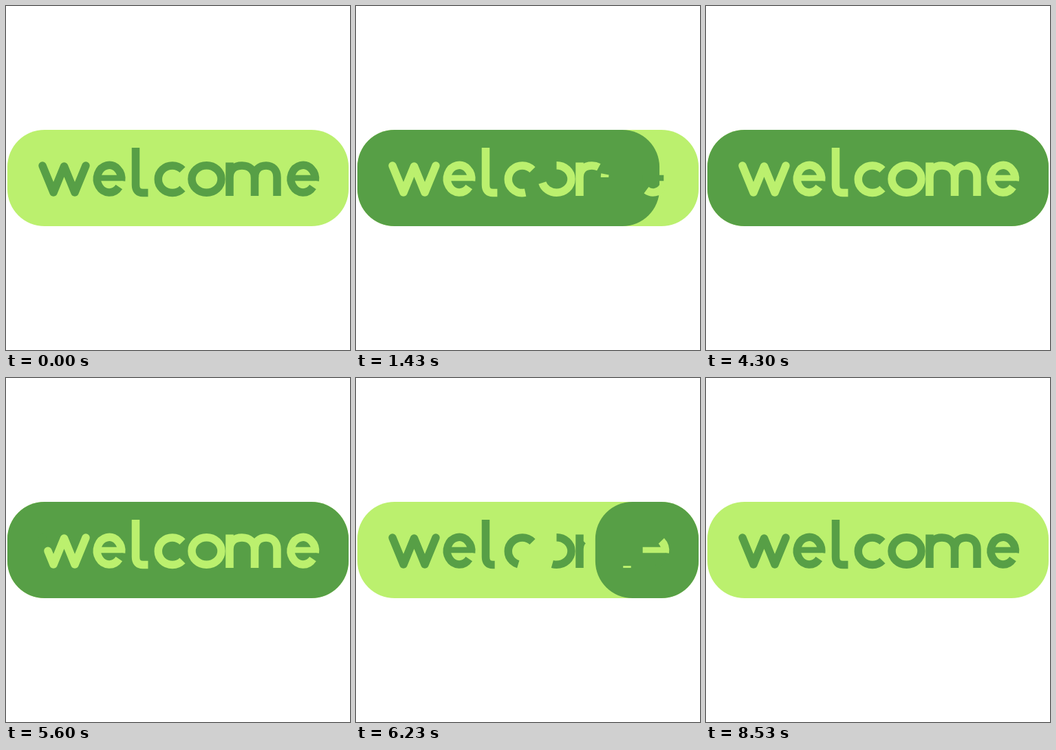
Recreate the animation shown at these times as an HTML page. Size 500x500 px, loop 9910 ms.

```html
<!DOCTYPE html>
<html lang="en">
<head>
<meta charset="utf-8">
<title>welcome</title>
<style>
html, body { margin: 0; width: 100%; height: 100%; overflow: hidden; background: #fff; }
svg { display: block; width: 100%; height: 100%; }
path { fill: none; }
</style>
</head>
<body>
<svg id="stage" viewBox="0 0 500 500" role="img" aria-label="welcome">
  <clipPath id="frame"><rect x="2" y="180" width="496" height="140" rx="54"/></clipPath>
  <g clip-path="url(#frame)">
    <rect x="2" y="180" width="496" height="140" fill="#bbf06e"/>
    <rect id="pill" y="180" width="620" height="140" rx="54" fill="#579f46"/>
    <g id="old"></g>
    <g id="new"></g>
  </g>
</svg>
<script>
const LIGHT = '#bbf06e', DARK = '#579f46';
const LOOP = 9910, STARTS = [500, 5400], LENGTH = 1630;
const ERASE_SPAN = 360, DRAW_SPAN = 600;

// from..to is the share of the letter's progress that this stroke takes.
const stroke = (d, erase, draw, { width = 11.5, from = 0, to = 1, end = 'butt' } = {}) =>
  ({ d, erase, draw, width, from, to, end });

// The bowl runs clockwise from the bottom terminal, then the thinner bar follows.
const letterE = (x, erase, draw) => [
  stroke(`M${x + 14.3} 263 A17.7 19.8 0 1 1 ${x + 17.6} 254`, erase, draw, { to: 0.79 }),
  stroke(`M${x + 18} 250 H${x - 15}`, erase, draw, { width: 8.5, from: 0.79 })
];

const strokes = [
  stroke('M53 232 L69 271 L84.5 233 L100 271 L116 232', 200, 220, { end: 'round' }),
  ...letterE(150, 298, 280),
  stroke('M188.5 206 V260 Q188.5 271.5 199 271.5 H206.5', 395, 380),
  stroke('M256.5 238 A20.5 19.8 0 1 0 256.5 265.5', 481, 480),
  stroke('M291.5 231.7 A21.5 19.8 0 0 1 291.5 271.3 A21.5 19.8 0 0 1 291.5 231.7', 510, 560),
  stroke('M325 276 V227.5 V249 C325 238 332 232 343 232 S361.5 239 361.5 249 V276', 341, 560),
  stroke('M361.5 249 C361.5 238 368 232 378 232 S394 239 394 249 V276', 528, 830),
  ...letterE(431.7, 640, 740)
];

const byId = id => document.getElementById(id);
const pill = byId('pill');

function makeWord(group) {
  return strokes.map(({ d, width, end }) => {
    const path = document.createElementNS('http://www.w3.org/2000/svg', 'path');
    path.setAttribute('d', d);
    path.setAttribute('pathLength', 1);
    path.setAttribute('stroke-width', width);
    path.setAttribute('stroke-linecap', end);
    path.setAttribute('stroke-linejoin', end === 'round' ? 'round' : 'miter');
    group.append(path);
    return path;
  });
}

const oldGroup = byId('old'), newGroup = byId('new');
const oldWord = makeWord(oldGroup), newWord = makeWord(newGroup);

const clamp = v => Math.min(1, Math.max(0, v));
const inOut = u => u < 0.5 ? 2 * u * u : 1 - 2 * (1 - u) ** 2;
const share = (s, p) => clamp((p - s.from) / (s.to - s.from));

// Cubic bezier easing (0.9, 0, 0.1, 1), solved by bisection.
function glide(u) {
  let lo = 0, hi = 1;
  for (let n = 0; n < 24; n++) {
    const s = (lo + hi) / 2, r = 1 - s;
    if (2.7 * r * r * s + 0.3 * r * s * s + s ** 3 < u) lo = s;
    else hi = s;
  }
  return lo * lo * (3 - 2 * lo);
}

function trim(path, from, to) {
  path.style.display = to - from < 0.001 ? 'none' : '';
  path.setAttribute('stroke-dasharray', `${to - from + (to === 1 ? 0.01 : 0)} 3`);
  path.setAttribute('stroke-dashoffset', -from);
}

function render(time) {
  const rest = time % 100;
  const t = time - rest + (rest < 30 ? 0 : 30);
  const phase = t < STARTS[1] ? 0 : 1;
  let local = t - STARTS[phase];
  if (local < 0) local = -1e4;
  if (local >= LENGTH) local = 1e4;

  const x = -60 + 580 * glide(clamp((local + 813) / 3100));
  pill.setAttribute('x', phase ? x : x - 580);

  oldGroup.setAttribute('stroke', phase ? LIGHT : DARK);
  newGroup.setAttribute('stroke', phase ? DARK : LIGHT);
  const ink = local + phase * 45;
  strokes.forEach((s, i) => {
    const gone = clamp((ink - s.erase) / ERASE_SPAN);
    const drawn = inOut(clamp((ink - s.draw) / DRAW_SPAN));
    trim(oldWord[i], share(s, gone), 1);
    trim(newWord[i], 0, share(s, drawn));
  });
}

const begin = performance.now();
function tick() {
  render((performance.now() - begin) % LOOP);
  requestAnimationFrame(tick);
}
tick();
</script>
</body>
</html>
```
